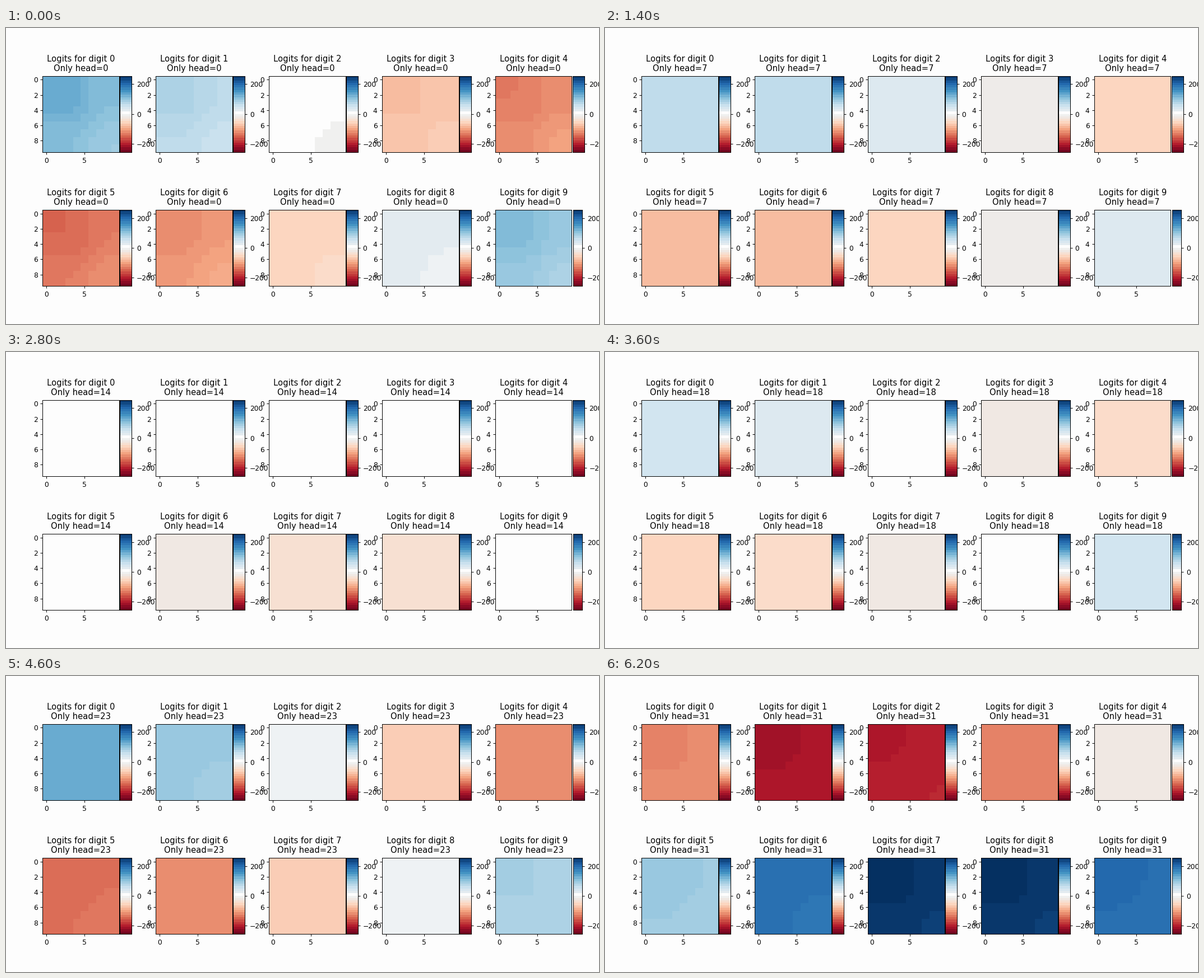
Write a matplotlib script that moves like this. It is 1058x529 px and loops after 6.4 s.

```python
import numpy as np
import matplotlib.pyplot as plt
from matplotlib.animation import FuncAnimation
from matplotlib.colors import LinearSegmentedColormap

W, H = 1058, 529
HEADS = 32
PAPER = "#fdfdfd"
SIZE = 136.4           # heatmap side in pixels
LEFT, PITCH = 65.4, 201.9
TOPS = (85.55, 324.8)

plt.rcParams["font.family"] = "DejaVu Sans"

# Red to blue, with a near-white plateau around zero.
CMAP = LinearSegmentedColormap.from_list("logits", [
    (0, "#67001f"), (.1, "#b2182b"), (.2, "#d6604d"), (.3, "#f4a582"),
    (.4, "#fddbc7"), (.465, "#eeebe9"), (.484, "#efeeed"), (.49, PAPER),
    (.518, PAPER), (.54, "#e6ecf0"), (.6, "#d1e5f0"), (.7, "#92c5de"),
    (.8, "#4393c3"), (.9, "#2166ac"), (1, "#053061")], N=1024)

# Key heads: colour level (0 red, 1 blue) at five digits, and how strongly
# the level fades towards the lower right corner.
KNOT_DIGITS = [0, 2, 5, 7, 9]
KNOTS = {
    0: ([.75, .5, .21, .385, .72], .25),
    3: ([.5, .5, .5, .5, .5], 0),
    10: ([.725, .6, .235, .305, .6], 0),
    14: ([.5, .509, .493, .42, .5], 0),
    21: ([.655, .5, .305, .465, .655], 0),
    26: ([.9, .585, .1, .25, .68], .07),
    31: ([.255, .1, .685, 1, .89], .05),
}
FADE_TO = .46
STEP = 1 / 64          # levels are drawn in visible steps

ramp = 1 / (1 + np.exp(-1.2 * (np.arange(10) - 5.5)))
CORNER = (ramp[:, None] + ramp[None, :]) / 2


def at_head(head, values):
    return np.interp(head, list(KNOTS), values)


def levels(head):
    """Ten 10 x 10 grids of colour levels, one per digit."""
    knots = [at_head(head, column)
             for column in zip(*(k for k, _ in KNOTS.values()))]
    fade = at_head(head, [f for _, f in KNOTS.values()])
    curve = np.polyfit(KNOT_DIGITS, knots, 4)
    base = np.clip(np.polyval(curve, np.arange(10)), 0, 1)[:, None, None]
    grid = base + (FADE_TO - base) * fade * CORNER
    return np.round(grid / STEP) * STEP


fig = plt.figure(figsize=(12, 6), dpi=W / 12, facecolor=PAPER)


def pixel_axes(x, top, w, h):
    return fig.add_axes([x / W, 1 - (top + h) / H, w / W, h / H],
                        facecolor=PAPER)


def add_colorbar(x, top, width):
    ax = pixel_axes(x, top, width, SIZE)
    bands = (np.arange(32) + .5)[:, None] / 32
    ax.imshow(bands, cmap=CMAP, vmin=0, vmax=1, aspect="auto",
              origin="lower", extent=(0, 1, -255, 255),
              interpolation="nearest")
    ax.set_xticks([])
    ax.yaxis.tick_right()
    ax.set_yticks([-200, 0, 200])


def add_panel(digit):
    row, col = divmod(digit, 5)
    x, top = LEFT + col * PITCH, TOPS[row]
    ax = pixel_axes(x, top, SIZE, SIZE)
    image = ax.imshow(np.zeros((10, 10)), cmap=CMAP, vmin=0, vmax=1,
                      aspect="auto", interpolation="nearest")
    ax.set_xticks([0, 5])
    ax.set_yticks(range(0, 10, 2))
    # The last colorbar is narrower and stands apart.
    if digit == 9:
        add_colorbar(x + 139.2, top, 16)
    else:
        add_colorbar(x + 137.65, top, 21.3)
    return image, ax.set_title("", pad=7)


panels = [add_panel(d) for d in range(10)]


def update(head):
    for digit, ((image, title), grid) in enumerate(zip(panels, levels(head))):
        image.set_data(grid)
        title.set_text(f"Logits for digit {digit}\nOnly head={head}")
    return []


anim = FuncAnimation(fig, update, frames=HEADS, interval=200, repeat=True,
                     repeat_delay=0)
plt.show()
```
